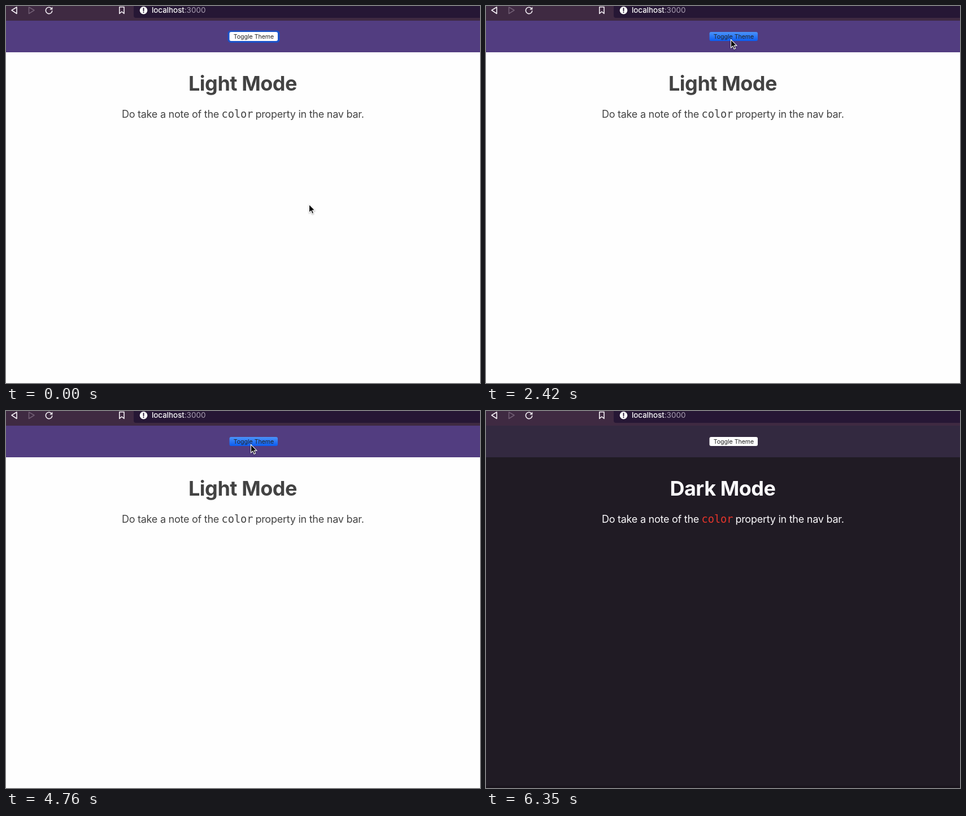
Write an HTML page that moves like this. It is 839 by 668 pixels and loops after 6410 ms.

```html
<!DOCTYPE html>
<html lang="en">
<head>
<meta charset="utf-8">
<title>Theme toggle</title>
<style>
html, body { margin: 0; width: 100%; height: 100%; overflow: hidden; background: #fefefe; }
svg { display: block; }
text { font-family: Inter, "Open Sans", sans-serif; font-optical-sizing: none; white-space: pre; }
#page { --bg: #fefefe; --nav: #523d80; --ink: #434343; --code: #434343; --edge: #fefefe; }
#page.dark { --bg: #201b24; --nav: #332940; --ink: #fbfafc; --code: #e5352b; --edge: #1a151d; }
#page text { text-anchor: middle; fill: var(--ink); }
#title { font-size: 36px; font-weight: 700; letter-spacing: -.45px; }
.note { font-size: 18px; letter-spacing: -.25px; }
#page .code { font: 18.6px "DejaVu Sans Mono", monospace; fill: var(--code); }
#page .label { font-size: 10.6px; letter-spacing: -.04px; fill: #222; }
.url { font-size: 13.5px; }
.icon { fill: none; stroke: #f3eef4; stroke-width: 1.6; stroke-linejoin: round; stroke-linecap: round; }
#cursor { filter: drop-shadow(0 1px 1px #0005); }
</style>
</head>
<body>
<svg width="839" height="668" viewBox="0 0 839 668">
  <defs>
    <linearGradient id="blue" x2="0" y2="1">
      <stop stop-color="#4b93f9"/>
      <stop offset="1" stop-color="#0a5cf0"/>
    </linearGradient>
  </defs>
  <rect width="839" height="668" fill="#fefefe"/>

  <g id="page">
    <rect y="26" width="839" height="642" fill="var(--bg)"/>
    <rect y="664" width="839" height="4" fill="var(--edge)"/>
    <rect y="26" width="839" height="56" fill="var(--nav)"/>
    <rect id="ring" x="392.5" y="43.5" width="92" height="21.5" rx="5" fill="#1b52c8"/>
    <rect id="button" x="395.5" y="46" width="85.5" height="16" rx="3"/>
    <text class="label" x="438.5" y="58">Toggle Theme</text>
    <text id="title" x="419" y="150"></text>
    <text class="note" x="291" y="198">Do take a note of the</text>
    <text class="code" x="409.5" y="198">color</text>
    <text class="note" x="537.5" y="198">property in the nav bar.</text>
  </g>

  <g id="toolbar">
    <rect width="839" height="26" fill="#3f2a42"/>
    <path d="M226 0H839V21H230Q226 21 226 17Z" fill="#261735"/>
    <path class="icon" d="M10 7.5L19 2V13.5Z"/>
    <path class="icon" d="M40.5 2L50 7.5L40.5 13.5Z" style="stroke:#705d73"/>
    <g id="reload">
      <path class="icon" d="M80.4 4.2A5.7 5.7 0 1 0 81.7 8.8"/>
      <path d="M82.4 1.4V6.6H77.2Z" fill="#f3eef4"/>
    </g>
    <path id="stop" class="icon" d="M70.2 2L81.8 13.6M81.8 2L70.2 13.6"/>
    <path class="icon" d="M200.8 1.8H209V13.4L204.9 10L200.8 13.4Z"/>
    <circle cx="243.5" cy="7.7" r="6.8" fill="#fff"/>
    <path d="M243.5 4V8.4M243.5 11V11.2" stroke="#261735" stroke-width="1.9" stroke-linecap="round"/>
    <text class="url" x="258" y="12.3" fill="#fff" stroke="#fff" stroke-width=".2">localhost<tspan fill="#a99fb2" stroke="none">:3000</tspan></text>
  </g>

  <path id="cursor" d="M0 0V14.6L3.4 11.5L5.6 16.8L8.1 15.7L5.9 10.6H10.4Z" fill="#000" stroke="#fff" stroke-width="1.1"/>
</svg>
<script>
const LOOP = 6410;
const $ = id => document.getElementById(id);
const show = (id, on) => $(id).style.display = on ? '' : 'none';
const within = (t, a, b) => t >= a && t < b;

// Number of steps taken at t, the first at start and the last at end
const stepsAt = (t, start, end, count) => t < start ? 0 :
  Math.min(count, Math.floor((t - start) * (count - 1) / (end - start) + 1e-6) + 1);

const leave = [[433, 60], [501, 113], [672, 295], [700, 378],
  [718, 457], [727, 518], [755, 600], [785, 636]];

function cursorAt(t) {
  if (t < 5540) {
    const u = stepsAt(t, 1740, 2180, 8) / 8, e = u * u * (3 - 2 * u);
    return [536.5 - 103 * e, 351.5 - 292 * e];
  }
  const [x, y] = leave[stepsAt(t, 5540, 5930, 7)];
  const out = stepsAt(t, 6170, 6350, 4);
  return [x + 4.5 * out, y + 9 * out];
}

function draw(t) {
  const dark = within(t, 2540, 3680) || t >= 4880;
  const pressed = within(t, 2420, 2540) || within(t, 4760, 4880);
  const loading = within(t, 360, 840);

  $('page').classList.toggle('dark', dark);
  $('title').textContent = dark ? 'Dark Mode' : 'Light Mode';
  $('button').setAttribute('fill', pressed ? 'url(#blue)' : '#fff');
  show('page', !within(t, 570, 840));
  show('ring', t < 570);
  show('reload', !loading);
  show('stop', loading);
  show('cursor', t < 6350);
  $('cursor').setAttribute('transform', `translate(${cursorAt(t)})`);
}

const start = performance.now();
function tick() {
  draw((performance.now() - start) % LOOP);
  requestAnimationFrame(tick);
}
tick();
</script>
</body>
</html>
```
